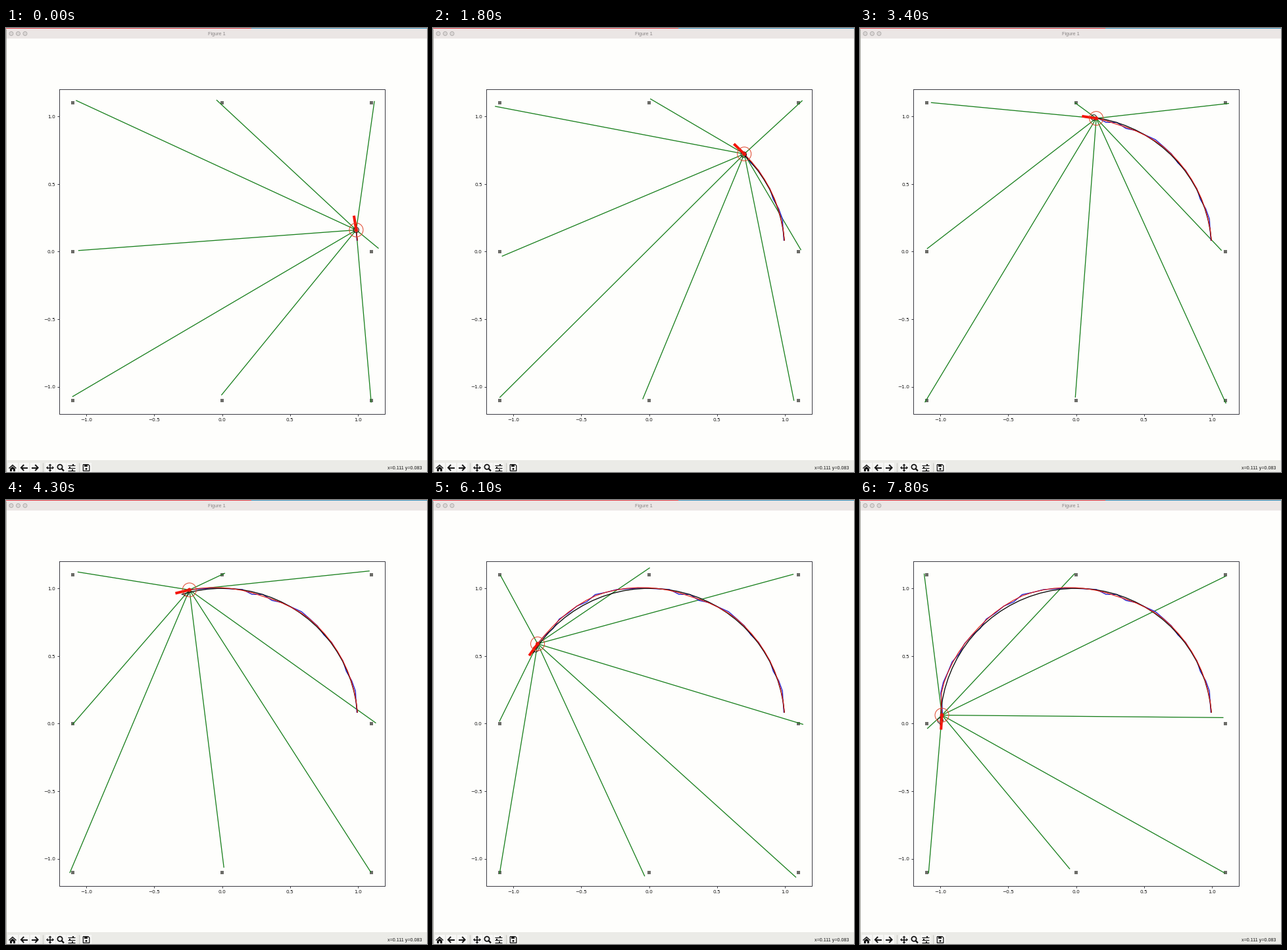
Animation of 640 by 674 pixels, one loop 8000 ms. Source, as a matplotlib script:

```python
from itertools import product

import numpy as np
import matplotlib.pyplot as plt
from matplotlib.animation import FuncAnimation
from matplotlib.patches import Circle, Polygon, Rectangle

W, H, DPI = 640, 674, 64
PT = 72 / DPI  # points per pixel
FRAMES, INTERVAL = 80, 100
TURN = 0.08  # radians per simulation step
LAST = 39  # last simulation step

INK = "#161616"
FRAME = "#3c3c44"
RAY = "#187f1c"
BUTTON = "#f7f7f5"

plt.rcParams["toolbar"] = "None"
fig = plt.figure(figsize=(W / DPI, H / DPI), dpi=DPI, facecolor="#fefefc")
ax = fig.add_axes([0, 0, 1, 1])
ax.set_xlim(0, W)
ax.set_ylim(H, 0)
ax.axis("off")


def px(x):
    return 328.5 + 206.4 * np.asarray(x)


def py(y):
    return 339.3 - 205.2 * np.asarray(y)


def polar(a, r=1.0):
    return np.array([px(r * np.cos(a)), py(r * np.sin(a))])


def line(xs, ys, color=INK, width=1.0, z=2, **kw):
    return ax.plot(xs, ys, color=color, lw=width * PT, zorder=z,
                   solid_capstyle="butt", **kw)[0]


def rect(x, y, w, h, color, z=1):
    ax.add_patch(Rectangle((x, y), w, h, fc=color, lw=0, zorder=z))


def circle(x, y, r, edge, z, width=1.0, face="none"):
    return ax.add_patch(
        Circle((x, y), r, fc=face, ec=edge, lw=width * PT, zorder=z))


def poly(points):
    ax.add_patch(Polygon(points, fc=INK, lw=0, zorder=5))


def label(x, y, s, size, color=INK, font="DejaVu Sans", ha="center"):
    ax.text(x, y, s, fontsize=size * PT, color=color, family=font,
            ha=ha, va="center_baseline", zorder=5)


# ---- window ----
def draw_window():
    rect(0, 0, W, 16, "#ebe6e5")
    rect(0, 0, 373, 1.4, "#e2414a")
    rect(373, 0, W - 373, 1.4, "#3f97c0")
    rect(0, 655.5, W, H - 655.5, "#ebebe7")
    rect(0, 2, 1, H - 2, "#a8a8a2", z=2)
    for x in (8, 18.5, 29):
        circle(x, 8.5, 3, "#aaa6a5", 3, 0.8, "#dad6d5")
    label(320.3, 8.5, "Figure 1", 7.2, "#8a8686", "Liberation Sans")
    label(632, 668, "x=0.111 y=0.083", 7.1, INK, "Liberation Sans", "right")


def arrow_icon(x, y, d):
    line([x - 4.5 * d, x + 5 * d], [y, y], width=2, z=5)
    line([x - 0.3 * d, x - 4.6 * d, x - 0.3 * d], [y - 4.5, y, y + 4.5],
         width=2, z=5, solid_joinstyle="miter")


def home_icon(x):
    poly([(x - 6, 668), (x, 662.5), (x + 6, 668),
          (x + 5, 669), (x, 664.6), (x - 5, 669)])
    poly([(x - 4, 669), (x, 665.5), (x + 4, 669), (x + 4, 673), (x - 4, 673)])
    rect(x - 1.2, 670, 2.4, 3, BUTTON, z=6)


def move_icon(x, y):
    for dx, dy in ((1, 0), (-1, 0), (0, 1), (0, -1)):
        line([x, x + 5 * dx], [y, y + 5 * dy], width=1.6, z=5)
        bx, by = x + 3.4 * dx, y + 3.4 * dy
        poly([(x + 6 * dx, y + 6 * dy), (bx + 2.5 * dy, by + 2.5 * dx),
              (bx - 2.5 * dy, by - 2.5 * dx)])


def draw_toolbar():
    y = 667.5
    for x in (10, 27.5, 44, 67, 83, 99, 122):
        rect(x - 7.5, 660, 15, 14, BUTTON)
    for x in (55.5, 110.5):
        line([x, x], [660, 674], "#c8c8c4")

    home_icon(10)
    arrow_icon(27.5, y, 1)
    arrow_icon(44, y, -1)
    move_icon(67, y)

    circle(82, 666.3, 3.6, INK, 5, 1.8)
    line([84.6, 88], [669, 672.4], width=2.4, z=5)

    for dy, knob in ((-4, 102), (0, 96.5), (4, 101)):
        line([93.5, 104.5], [y + dy, y + dy], width=1.2, z=5)
        rect(knob - 1, y + dy - 1.6, 2, 3.2, INK, z=6)

    line([117.3, 125, 126.8, 126.8, 117.3, 117.3],
         [662.7, 662.7, 664.5, 672.3, 672.3, 662.7], width=1.3, z=5)
    rect(119, 663, 5.2, 3, INK, z=5)
    circle(122, 669.3, 1.5, "none", 5, 0, INK)


def draw_plot():
    line([81, 576, 576, 81, 81], [93, 93, 585.5, 585.5, 93], FRAME, z=6,
         solid_joinstyle="miter")
    for v in np.linspace(-1, 1, 5):
        name = f"{v:.1f}".replace("-", "\u2212")
        x, y = px(v), py(v)
        line([x, x], [585.5, 589], FRAME)
        line([77.5, 81], [y, y], FRAME)
        label(x, 594.3, name, 7.4)
        label(74.8, y + 0.3, name, 7.4, ha="right")
    for mx, my in MARKS:
        rect(mx - 2.5, my - 2.5, 5, 5, "#6c6c68", z=3)


# ---- simulation ----
MARKS = [(px(x), py(y)) for x, y in product((-1.1, 0, 1.1), repeat=2)
         if (x, y) != (0, 0)]

rng = np.random.default_rng(4)
TRUE_A = TURN * np.arange(1, LAST + 1)
# the estimate slowly falls behind the true pose
EST_A = TRUE_A - 0.041 * np.clip((TRUE_A - 0.8) / 1.4, 0, 1)
DRIFT = np.interp(EST_A, [.08, .9, 1.25, 1.95, 2.4, 2.9, 3.08],
                  [0, .007, -.013, .025, .008, .02, -.01])
TRUE_XY = polar(TRUE_A)
RED_XY = polar(EST_A, 1 + DRIFT)
BLUE_XY = polar(EST_A, 1 + DRIFT + rng.normal(0, .006, LAST))
NOISE = rng.normal(0, 4.5, (LAST + 1, len(MARKS), 2))


def step_at(frame):
    """The simulation runs at an uneven pace, about five steps a second."""
    k = np.interp(frame, [4, 11, 26, 43, 54, 68, 78],
                  [2, 7, 13, 23, 29, 34, LAST])
    return int(k + 0.5)


def heading(x, y, a, size):
    return [x, x - size * np.sin(a)], [y, y - size * np.cos(a)]


draw_window()
draw_toolbar()
draw_plot()

rays = [line([], [], RAY, 1.3, 4) for _ in MARKS]
blue = line([], [], "#1c1cd0", 1.3, 7)
black = line([], [], "#101010", 1.4, 8)
red = line([], [], "#e01c14", 1.2, 9)
true_dir = line([], [], "#101010", 1.4, 10)
arrow = line([], [], "#f41408", 4, 11)
robot = circle(0, 0, 4.2, "#1c1414", 10)
dot = circle(0, 0, 3, "none", 11, 0, "#e81810")
spread = circle(0, 0, 10.5, "#e0452c", 12)


def draw(frame):
    k = step_at(frame)
    i = k - 1
    x, y = RED_XY[:, i]
    tx, ty = TRUE_XY[:, i]
    for ray, (mx, my), (ex, ey) in zip(rays, MARKS, NOISE[k]):
        ray.set_data([x, mx + ex], [y, my + ey])
    for path, xy in ((blue, BLUE_XY), (black, TRUE_XY), (red, RED_XY)):
        path.set_data(xy[:, :k])
    true_dir.set_data(*heading(tx, ty, TRUE_A[i], 7))
    arrow.set_data(*heading(x, y, EST_A[i], 22))
    robot.center = tx, ty
    dot.center = spread.center = x, y
    return [*rays, blue, black, red, true_dir, arrow, robot, dot, spread]


anim = FuncAnimation(fig, draw, frames=FRAMES, interval=INTERVAL,
                     repeat=True, repeat_delay=0, blit=False)
plt.show()
```
